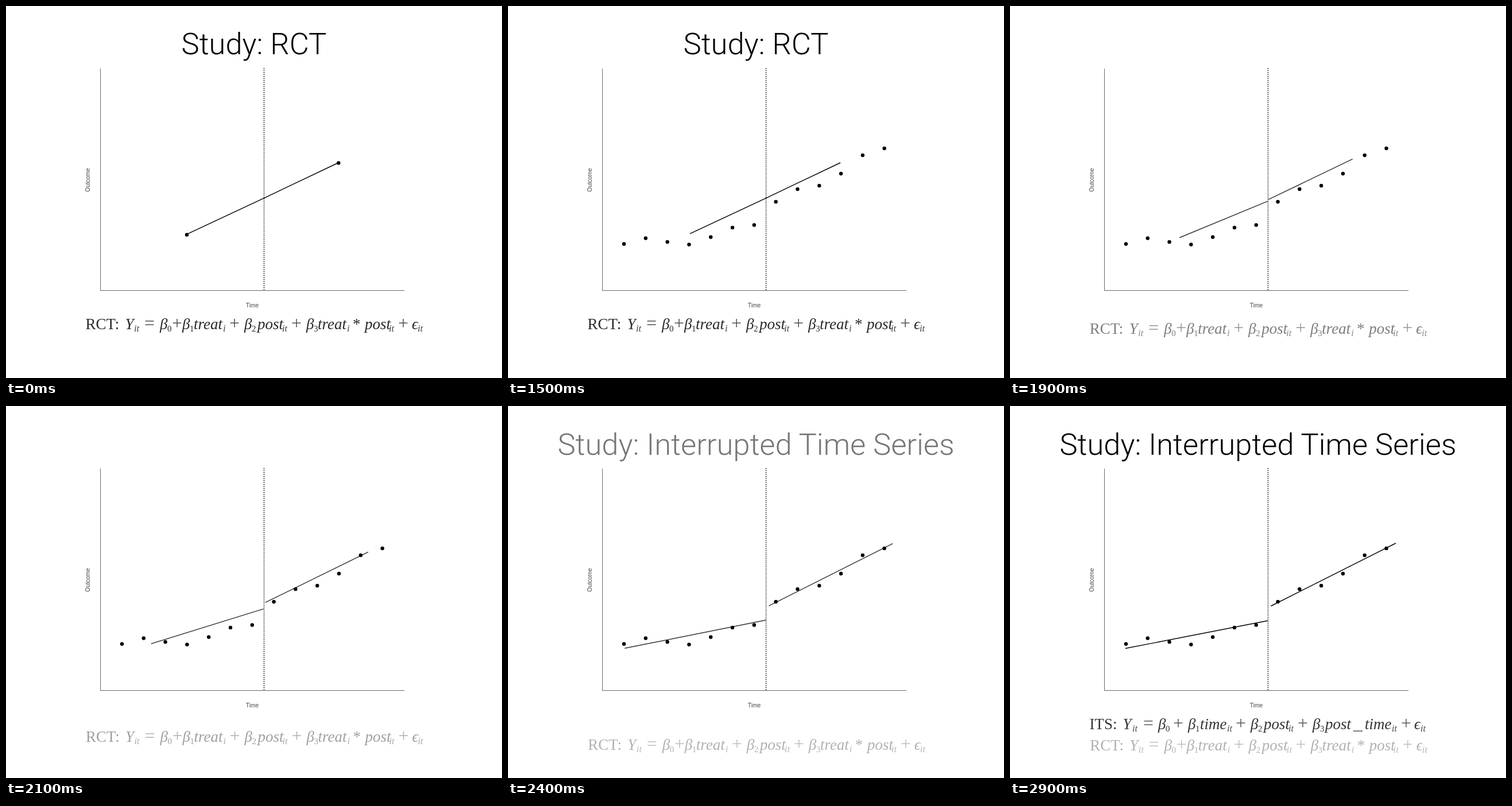
These frames come from a looping animation (864x648 px, 3900 ms). An HTML page:

```html
<!DOCTYPE html>
<html lang="en">
<head>
<meta charset="utf-8">
<title>From RCT to interrupted time series</title>
<style>
  html, body { margin: 0; width: 100%; height: 100%; overflow: hidden; background: #fff; }
  svg { display: block; width: 864px; height: 648px; }
  .title { font: 300 52.5px Roboto, Inter, sans-serif; text-anchor: middle; }
  .label { font: 10.2px "Liberation Sans", Arial, sans-serif; text-anchor: middle; fill: #444; }
  .eq { font: 27px "Liberation Serif", "DejaVu Serif", serif; fill: #2a2a2a; }
  .var, .sub { font-style: italic; }
  .sub { font-size: 16.5px; fill-opacity: .9; }
  .num { font-size: 15px; }
  .op { font-size: 32px; fill-opacity: .8; }
  .axis { stroke: #666; }
  .fit { stroke-width: 1.4; }
</style>
</head>
<body>
<svg id="stage" viewBox="0 0 864 648">
  <text class="title" id="titleA" x="432" y="84">Study: RCT</text>
  <text class="title" id="titleB" x="432" y="85">Study: Interrupted Time Series</text>
  <path class="axis" d="M164.6 109V496M164 495.6H694" fill="none"/>
  <path d="M449.5 108V495" stroke="#000" stroke-width="1.5" stroke-dasharray="1.5 2"/>
  <text class="label" x="429" y="524.7">Time</text>
  <text class="label" transform="translate(146 303) rotate(-90)">Outcome</text>
  <g id="chart"></g>
  <g class="eq" id="its"></g>
  <g class="eq" id="rct"></g>
</svg>
<script>
const LOOP = 3900, STEP = 100, BASE = 562.5;
const $ = id => document.getElementById(id);
const clamp = v => Math.min(1, Math.max(0, v));
const ramp = (t, a, b) => clamp((t - a) / (b - a));
const ease = u => (1 - Math.cos(Math.PI * u)) / 2;
const mix = (a, b, p) => a + (b - a) * p;

function add(parent, tag, attrs, text = '') {
  const el = document.createElementNS('http://www.w3.org/2000/svg', tag);
  set(el, attrs);
  el.textContent = text;
  return parent.appendChild(el);
}
function set(el, attrs) {
  for (const k in attrs) el.setAttribute(k, attrs[k]);
}

// Each term is "text x"; a leading underscore marks a subscript.
function equation(id, terms) {
  for (const term of terms.split(',')) {
    let [s, x] = term.split(' '), y = BASE, cls = 'var';
    if (/^[+=_]$/.test(s)) cls = 'op';
    else if (s[0] === '_') {
      s = s.slice(1);
      y += 4;
      cls = /\d/.test(s) ? 'num' : 'sub';
    } else if (/[:*]/.test(s)) cls = 'roman';
    add($(id), 'text', { x, y, class: cls }, s);
  }
}
equation('rct', 'RCT: 138.5,Y 207.5,_it 223,= 241,β 268,_0 281,+ 289,β 307,_1 320,treat 327,_i 378,' +
  '+ 389,β 415,_2 428,post 438,_it 481,+ 497,β 523,_3 536,treat 543,_i 594,* 604,' +
  'post 625,_it 667,+ 683,ϵ 707,_it 717');
equation('its', 'ITS: 138.5,Y 196.5,_it 213,= 232,β 258,_0 271,+ 284,β 310,_1 323,time 331,_it 378,' +
  '+ 393,β 419,_2 432,post 442,_it 485,+ 501,β 527,_3 540,post 549,_ 598,' +
  'time 618,_it 665,+ 681,ϵ 704,_it 715');

// A segment is interpolated by its centre, length and angle.
function segment(x1, y1, x2, y2) {
  const dx = x2 - x1, dy = y2 - y1;
  return [(x1 + x2) / 2, (y1 + y2) / 2, Math.hypot(dx, dy) / 2, Math.atan2(dy, dx)];
}
const fits = [
  [segment(317, 396.6, 449, 334.8), segment(201, 422.3, 449, 374)],
  [segment(449, 334.8, 579, 273), segment(454.5, 348.5, 672, 239)]
].map(([from, to]) => ({ from, to, el: add($('chart'), 'line', { class: 'fit' }) }));

const heights = [414.5, 404.5, 411, 415.5, 402.5, 386, 381.5, 341, 319, 313, 292, 260, 248];
const starts = { 3: [315, 398.5], 10: [579.3, 273.4] };
const dots = heights.map((y, i) => ({
  x: 202 + i * 37.8, y, start: starts[i], el: add($('chart'), 'circle', { r: 3.2 })
}));

function draw(t) {
  const spread = ease(ramp(t, 1000, 1500));
  const shown = ramp(t, 1300, 1500);
  for (const { x, y, start, el } of dots) {
    const [sx, sy] = start || [x, y];
    set(el, { cx: mix(sx, x, spread), cy: mix(sy, y, spread), opacity: start ? 1 : shown });
  }

  const moving = t >= 1700;
  const p = moving ? ease(ramp(t, 1671, 2471)) : 0;
  for (const { from, to, el } of fits) {
    const [cx, cy, r, a] = from.map((v, i) => mix(v, to[i], p));
    const dx = r * Math.cos(a), dy = r * Math.sin(a);
    set(el, {
      x1: cx - dx, y1: cy - dy, x2: cx + dx, y2: cy + dy,
      stroke: moving && t < 2500 ? '#333' : '#000'
    });
  }

  const u = moving ? ramp(t, 1645, 2445) : 0, drop = ease(u);
  set($('rct'), {
    transform: `translate(${drop * 0.8} ${drop * 37})`,
    opacity: mix(0.36, 1, (1 - u) ** 2.5)
  });
  set($('its'), { opacity: 0.95 * ramp(t, 2500, 2900) });
  set($('titleA'), { opacity: moving ? 1 - ramp(t, 1671, 1871) : 1 });
  set($('titleB'), { opacity: ramp(t, 2285, 2500) });
}

function tick() {
  draw(Math.floor(performance.now() % LOOP / STEP) * STEP);
  requestAnimationFrame(tick);
}
tick();
</script>
</body>
</html>
```
